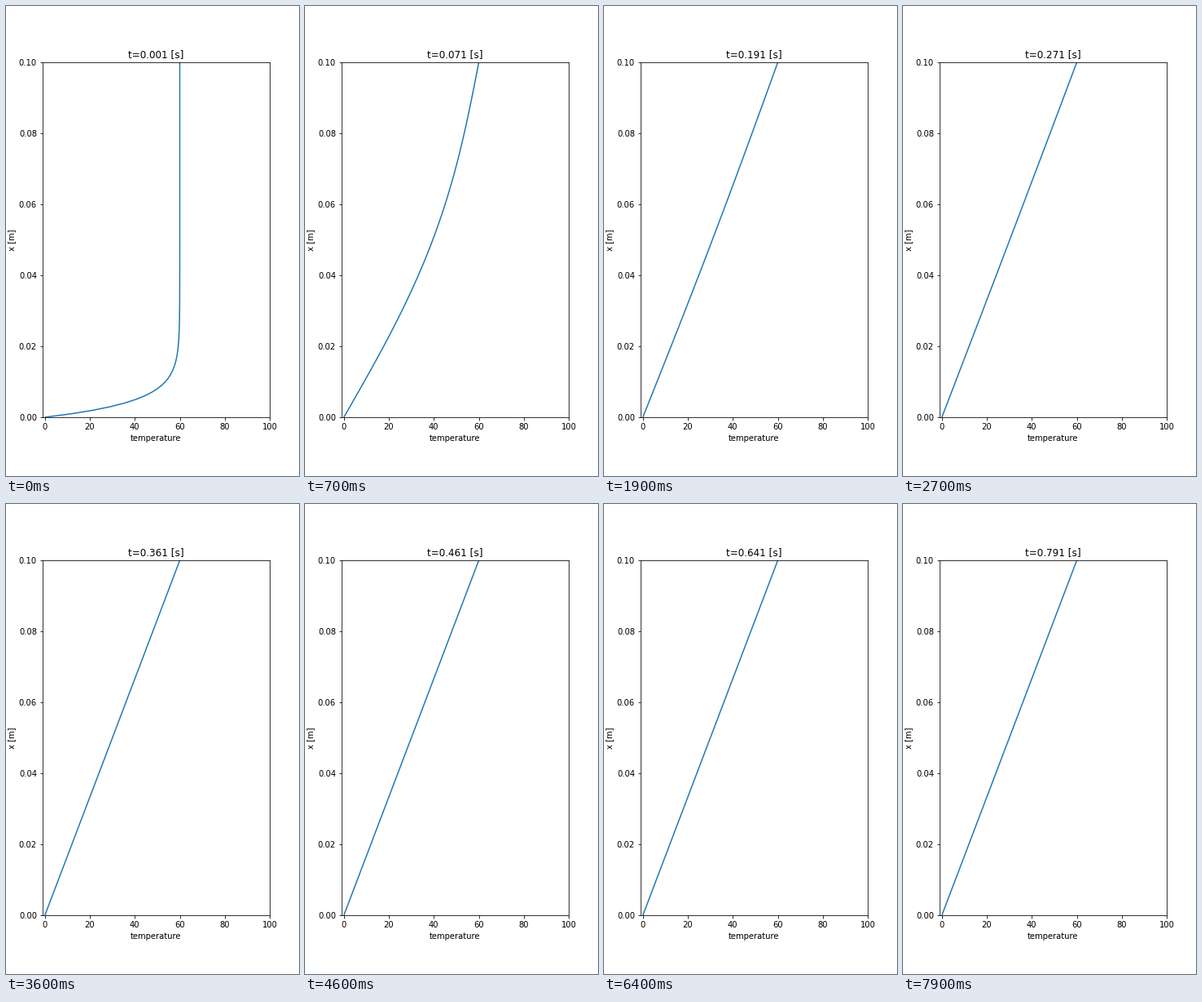
Write a matplotlib script that moves like this. It is 360 px wide and 576 px high and loops after 8 s.

```python
import numpy as np
import matplotlib.pyplot as plt
from matplotlib.animation import FuncAnimation

FRAMES, INTERVAL = 80, 100
LENGTH, CELLS = 0.1, 100
DT, STEPS_PER_FRAME = 0.001, 10
DIFFUSIVITY = 0.02
T_START, T_COLD = 60.0, 0.0

plt.rcParams.update({"font.family": "DejaVu Sans", "font.size": 10})

x = np.linspace(0, LENGTH, CELLS + 1)


def implicit_step_matrix():
    """One backward Euler step of the heat equation, with fixed ends."""
    r = DIFFUSIVITY * DT / (x[1] - x[0]) ** 2
    m = np.eye(CELLS + 1)
    for i in range(1, CELLS):
        m[i, i - 1:i + 2] = -r, 1 + 2 * r, -r
    return np.linalg.inv(m)


def solve():
    step = implicit_step_matrix()
    temp = np.full(CELLS + 1, T_START)
    temp[0] = T_COLD
    profiles = []
    for n in range(FRAMES * STEPS_PER_FRAME):
        temp = step @ temp
        if n % STEPS_PER_FRAME == 0:
            profiles.append(temp)
    return profiles


profiles = solve()

fig, ax = plt.subplots(figsize=(5, 8), dpi=72)
fig.subplots_adjust(left=0.125, right=0.9, bottom=0.125, top=0.88)
ax.set(xlim=(-1, 100), ylim=(0, LENGTH), xlabel="temperature", ylabel="x [m]")
line, = ax.plot([], [], color="#1f77b4", lw=1.5)
title = ax.set_title("")


def update(frame):
    time = (1 + frame * STEPS_PER_FRAME) * DT
    line.set_data(profiles[frame], x)
    title.set_text(f"t={time:.3f} [s]")
    return line, title


anim = FuncAnimation(fig, update, frames=FRAMES, interval=INTERVAL,
                     repeat=True, repeat_delay=0, blit=False)
plt.show()
```
